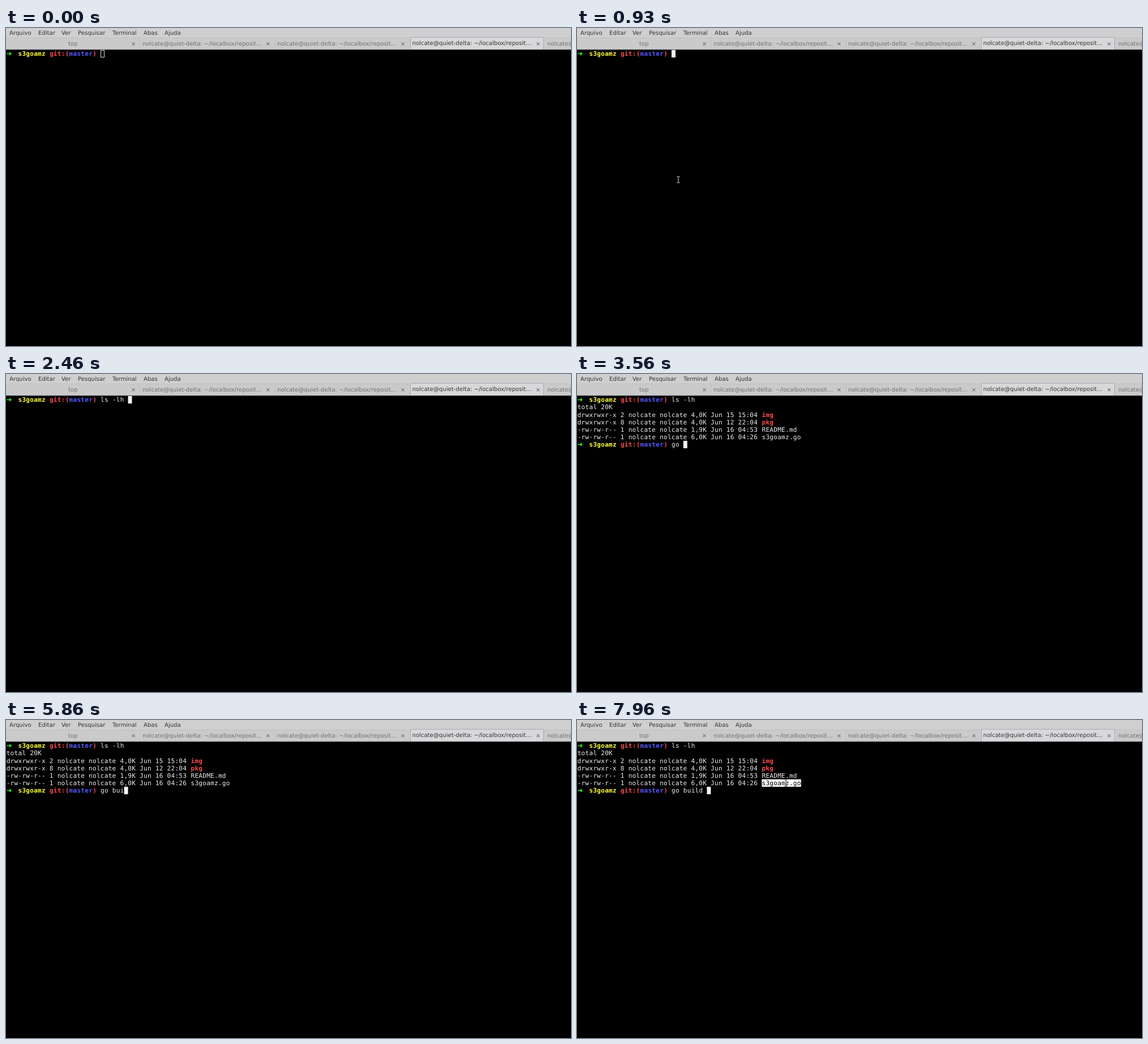
An HTML page that plays this animation: 998x561 px, repeating every 8 s.

```html
<!DOCTYPE html>
<html lang="pt">
<head>
<meta charset="utf-8">
<title>Terminal</title>
<style>
  html, body { margin: 0; width: 100%; height: 100%; overflow: hidden; background: #000; }
  svg { display: block; width: 998px; height: 561px; }
  text { white-space: pre; text-rendering: geometricPrecision; }
  .ui { font: 10.1px "DejaVu Sans", sans-serif; fill: #333; }
  .tab { fill: #707070; }
  .close { font: bold 10px "DejaVu Sans", sans-serif; fill: #757575; text-anchor: middle; }
  .term { font: 11.09px "DejaVu Sans Mono", monospace; letter-spacing: .254px; fill: #eee; }
  .bold { font-weight: bold; }
  .arrow { font: bold 11.5px "DejaVu Sans", sans-serif; fill: #3f3; }
  .yellow { fill: #ffff3c; }
  .red { fill: #ff4b4b; }
  .blue { fill: #5858ff; }
  #pointer { fill: none; stroke: #ddd; mix-blend-mode: difference; }
</style>
</head>
<body>
<svg id="stage" viewBox="0 0 998 561">
  <rect width="998" height="561"/>
  <rect width="998" height="38" fill="#cfcfcf"/>
  <g id="menu"></g>
  <rect y="17" width="998" height="21" fill="#cacaca"/>
  <path d="M0 17.5H998M.5 18V38M236.5 18V38M475.5 18V38" stroke="#c0c0c0" fill="none"/>
  <path d="M714.5 38V16.5H949.5V38" fill="#d8d8da" stroke="#aaaabc"/>
  <path d="M0 38H998" stroke="#8c8c9c" stroke-width=".8"/>
  <g id="tabs"></g>
  <g id="terminal"></g>
  <rect id="caret"/>
  <path id="pointer" d="M-2.5 -5.5H-.8L0 -4.8L.8 -5.5H2.5M0 -5V5M-2.5 5.5H-.8L0 4.8L.8 5.5H2.5"/>
</svg>
<script>
const LOOP = 8000, CELL = 6.931, ROW = 13.168, LEFT = 0.7, TOP = 38.8, ASCENT = 10.5;
const FOCUS = 600, ENTER = 2700, SELECT = 7480;
const get = id => document.getElementById(id);
const colX = col => LEFT + col * CELL;
const rowY = row => TOP + row * ROW;

function setAttrs(node, attrs) {
  for (const key in attrs) node.setAttribute(key, attrs[key]);
}

function add(parent, tag, attrs, content = "") {
  const node = document.createElementNS("http://www.w3.org/2000/svg", tag);
  setAttrs(node, attrs);
  node.textContent = content;
  return parent.appendChild(node);
}

// Window chrome
const menuItems = { Arquivo: 6, Editar: 57, Ver: 98, Pesquisar: 127, Terminal: 188, Abas: 243, Ajuda: 280 };
for (const [label, x] of Object.entries(menuItems))
  add(get("menu"), "text", { x, y: 11.7, class: "ui" }, label);

const user = "nolcate";
const tabTitle = user + "@quiet-delta: ~/localbox/reposit…";
function tab(x, title, closeX, active) {
  add(get("tabs"), "text", { x, y: active ? 30.3 : 31, class: active ? "ui" : "ui tab" }, title);
  if (closeX) add(get("tabs"), "text", { x: closeX, y: 30.8, class: "close" }, "×");
}
tab(110, "top", 225);
tab(241, tabTitle, 463);
tab(479, tabTitle, 701);
tab(717.5, tabTitle, 940, true);
tab(956, tabTitle);

// Terminal contents
const terminal = get("terminal");
const print = (parent, row, col, string, style = "") =>
  add(parent, "text", { x: colX(col), y: rowY(row) + ASCENT, class: "term " + style }, string);

function prompt(parent, row) {
  add(parent, "text", { x: colX(0), y: rowY(row) + ASCENT, class: "arrow" }, "➜");
  print(parent, row, 3, "s3goamz", "bold yellow");
  print(parent, row, 11, "git:(", "bold red");
  print(parent, row, 16, "master", "bold blue");
  print(parent, row, 22, ")", "bold red");
}

prompt(terminal, 0);
const output = add(terminal, "g", {});
print(output, 1, 0, "total 20K");
const files = [
  ["drwxrwxr-x 2", "4,0K Jun 15 15:04", "img"],
  ["drwxrwxr-x 8", "4,0K Jun 12 22:04", "pkg"],
  ["-rw-rw-r-- 1", "1,9K Jun 16 04:53", "README.md"],
  ["-rw-rw-r-- 1", "6,0K Jun 16 04:26", "s3goamz.go"]
];
const selection = add(output, "rect", { x: colX(47), y: rowY(5), width: 10 * CELL, height: ROW });
let lastName;
files.forEach(([mode, info, name], i) => {
  print(output, i + 2, 0, `${mode} ${user} ${user} ${info}`);
  lastName = print(output, i + 2, 47, name, mode[0] === "d" ? "bold red" : "");
});
prompt(output, 6);

// Each key press has its own time
const commands = [
  { row: 0, string: "ls -lh ", keys: [1500, 1610, 1760, 1950, 2110, 2240, 2400] },
  { row: 6, string: "go build ", keys: [3100, 3220, 3420, 4400, 5350, 5720, 6060, 6280, 6500] }
];
for (const command of commands) command.node = print(terminal, command.row, 24, "");

const caret = get("caret"), pointer = get("pointer");
const show = (node, on) => node.setAttribute("visibility", on ? "visible" : "hidden");
const ease = p => p * p * (3 - 2 * p);

function glide(t, start, end, from, to) {
  const p = ease(Math.min(1, Math.max(0, (t - start) / (end - start))));
  return from.map((v, i) => v + (to[i] - v) * p);
}

function draw(t) {
  for (const command of commands) {
    command.typed = command.keys.filter(key => key <= t).length;
    command.node.textContent = command.string.slice(0, command.typed);
  }
  const current = commands[t < ENTER ? 0 : 1];
  const focused = t >= FOCUS;
  const inset = focused ? 0 : 0.5;
  setAttrs(caret, {
    x: colX(24 + current.typed) + inset,
    y: rowY(current.row) + inset,
    width: CELL - 2 * inset,
    height: ROW - 2 * inset,
    fill: focused ? "#f4f4f0" : "none",
    stroke: focused ? "none" : "#ddd"
  });

  show(output, t >= ENTER);
  const selected = t >= SELECT;
  selection.setAttribute("fill", selected ? "#fff" : "none");
  lastName.style.fill = selected ? "#000" : "";

  const rest = [179, 267.5];
  const [x, y] = t < 3000
    ? glide(t, 30, 560, [-6, 466], rest)
    : glide(t, 6730, 7330, rest, [369, 111.5]);
  pointer.setAttribute("transform", `translate(${x} ${y})`);
  show(pointer, (t >= 30 && t < commands[0].keys[0]) || t >= 6730);
}

let start;
function tick(now) {
  start ??= now;
  draw((now - start) % LOOP);
  requestAnimationFrame(tick);
}
draw(0);
requestAnimationFrame(tick);
</script>
</body>
</html>
```
